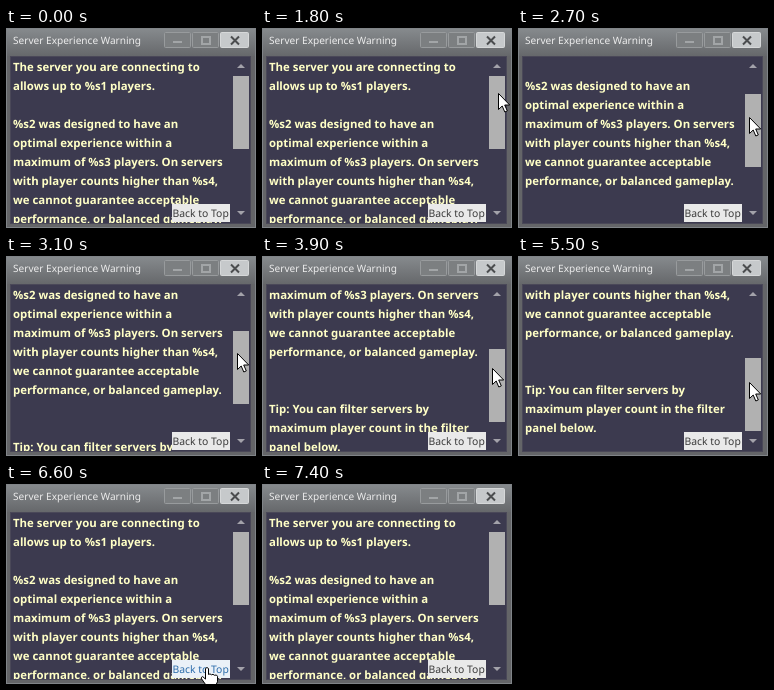
Animation of 250 by 200 pixels, one loop 7.9 s. Source, as an HTML page:

```html
<!DOCTYPE html>
<html lang="en">
<head>
<meta charset="utf-8">
<title>Server Experience Warning</title>
<style>
  html, body { margin: 0; width: 100%; height: 100%; overflow: hidden; background: #646568; }
  svg { display: block; width: 250px; height: 200px; }
  text { font-family: "Noto Sans", "Open Sans", sans-serif; text-rendering: geometricPrecision; }
  .title { font-size: 10.1px; fill: #ececec; }
  .body { font-size: 11.4px; font-weight: 700; fill: #ffffc6; }
  .caption rect { fill: #7c7f81; stroke: #989b9d; }
  .caption path { fill: none; stroke: #a2a5a7; stroke-width: 2; }
  .caption .close rect { fill: #c6c9cb; stroke: #d6d8d9; }
  .caption .close path { stroke: #4b4d4f; }
  #button rect { fill: #e9e9e9; }
  #button text { font-size: 10.4px; fill: #3a3a3a; }
  #button.hover rect { fill: #eaf1f8; }
  #button.hover text { fill: #2c6cab; }
  #cursor path { fill: #fff; stroke: #000; stroke-linejoin: round; }
</style>
</head>
<body>
<svg viewBox="0 0 250 200">
  <defs>
    <linearGradient id="bar" x2="0" y2="1">
      <stop offset="0" stop-color="#878b8e"/>
      <stop offset="1" stop-color="#66686b"/>
    </linearGradient>
    <clipPath id="view"><rect x="5" y="32" width="221" height="163"/></clipPath>
  </defs>

  <rect width="250" height="200" fill="#646568"/>
  <rect width="250" height="28" fill="url(#bar)"/>
  <rect x=".5" y=".5" width="249" height="199" fill="none" stroke="#808488"/>
  <text class="title" x="7" y="16">Server Experience Warning</text>

  <g class="caption">
    <rect x="158.5" y="4.5" width="26" height="15" rx="1"/>
    <rect x="186.5" y="4.5" width="26" height="15" rx="1"/>
    <path d="M167 14h9M196 9h8v7h-8z"/>
    <g class="close">
      <rect x="214.5" y="4.5" width="28" height="15" rx="1"/>
      <path d="M225 8.5l8 8m0-8l-8 8"/>
    </g>
  </g>

  <rect x="4.5" y="28.5" width="240" height="167" fill="#3c3a4f" stroke="#4a4858"/>
  <g clip-path="url(#view)"><g id="copy"></g></g>

  <path d="M231 40l4-4 4 4zM231 183l4 4 4-4z" fill="#a3a2aa"/>
  <rect id="thumb" x="227" width="16" height="73" fill="#b1b1b1"/>

  <g id="button">
    <rect x="166" y="176" width="58" height="18"/>
    <text x="166.5" y="188.5">Back to Top</text>
  </g>

  <g id="cursor">
    <path id="arrow" d="M.5.5v16l3.7-3.5 2.600 6 2.5-1.100-2.600-5.900h5z"/>
    <path id="hand" d="M-1.500 1.500q1.500-2 3 0v6q1.500-1.400 3 .3 1.500-1.200 3 .5 2.300-1.100 3 1v5.500l-2 4v2h-9v-2l-5-7q-.6-2 1.200-2.200l2.800 2.500z"/>
  </g>
</svg>
<script>
const LOOP = 7900, STEP = 100, LINE = 19, NOTCH = 9, LAST_ROW = 6, CLICK = 6600;
const COPY = `The server you are connecting to
allows up to %s1 players.

%s2 was designed to have an
optimal experience within a
maximum of %s3 players. On servers
with player counts higher than %s4,
we cannot guarantee acceptable
performance, or balanced gameplay.


Tip: You can filter servers by
maximum player count in the filter
panel below.`;

// Pointer stops: enter, grab the thumb, drag it down, press the button, leave
const STOPS = [
  { t: 300, x: 247, y: 57 },
  { t: 800, x: 236, y: 65 },
  { t: 1800, x: 236, y: 65 },
  { t: 2700, x: 231, y: 89 },
  { t: 3900, x: 230, y: 112 },
  { t: 4200, x: 231, y: 126 },
  { t: 5600, x: 231, y: 126 },
  { t: 6300, x: 201, y: 183 },
  { t: 6700, x: 201, y: 183 },
  { t: 7400, x: 252, y: 162 }
];
const GRAB_Y = STOPS[2].y;

const $ = id => document.getElementById(id);
const move = (el, x, y) => el.setAttribute("transform", `translate(${x} ${y})`);
const show = (el, on) => { el.style.display = on ? "" : "none"; };
const mix = (a, b, k) => Math.round(a + (b - a) * k);

COPY.split("\n").forEach((line, i) => {
  const text = document.createElementNS("http://www.w3.org/2000/svg", "text");
  text.setAttribute("class", "body");
  text.setAttribute("x", 7);
  text.setAttribute("y", 43 + i * LINE);
  text.textContent = line;
  $("copy").append(text);
});

function pointerAt(t) {
  const i = STOPS.findIndex(stop => stop.t > t);
  if (i < 1) return null;
  const a = STOPS[i - 1], b = STOPS[i];
  const k = (t - a.t) / (b.t - a.t);
  return { x: mix(a.x, b.x, k), y: mix(a.y, b.y, k) };
}

function draw(t) {
  const p = pointerAt(t);
  const dragged = p && t < CLICK ? Math.floor((p.y - GRAB_Y) / NOTCH) : 0;
  const row = Math.max(0, Math.min(LAST_ROW, dragged));
  const hover = !!p && p.x >= 166 && p.x < 224 && p.y >= 176 && p.y < 194;

  move($("copy"), 0, -row * LINE);
  $("thumb").setAttribute("y", 48 + row * NOTCH);
  $("button").classList.toggle("hover", hover);
  show($("cursor"), p);
  show($("arrow"), !hover);
  show($("hand"), hover);
  if (p) move($("cursor"), p.x, p.y);
}

const start = performance.now();
function tick() {
  const t = (performance.now() - start) % LOOP;
  draw(Math.floor(t / STEP) * STEP);
  requestAnimationFrame(tick);
}
tick();
</script>
</body>
</html>
```
